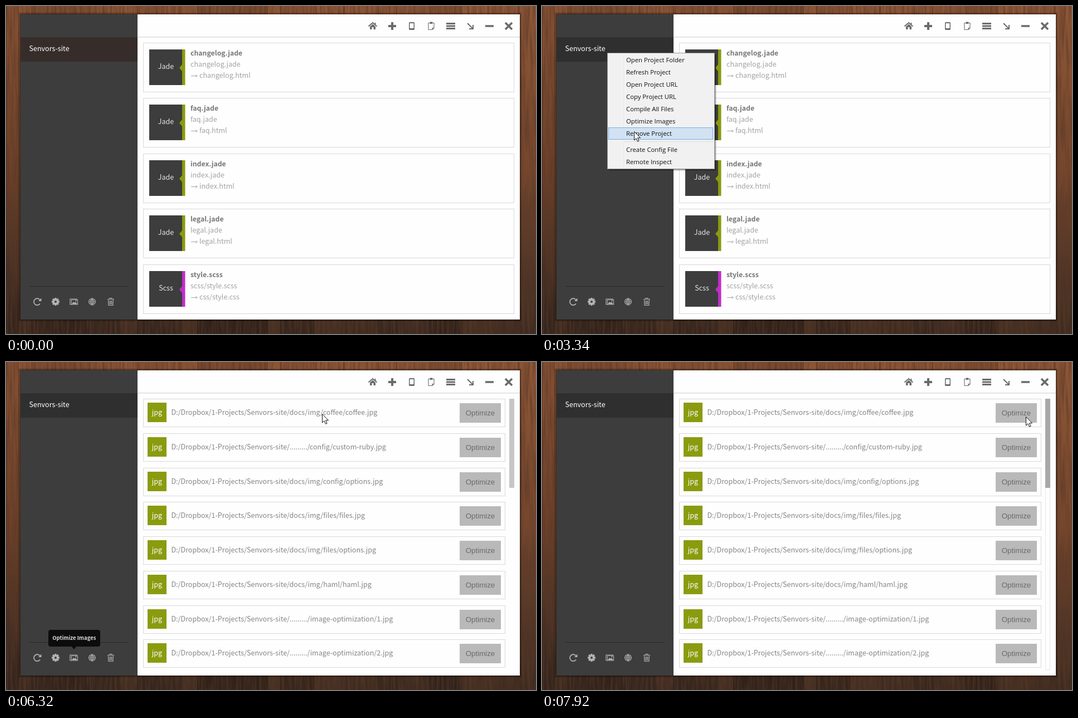
Recreate the animation shown at these times as an HTML page. Size 951 by 589 pixels, loop 8 s.

```html
<!DOCTYPE html>
<html lang="en">
<head>
<meta charset="utf-8">
<title>Project window</title>
<style>
html, body { margin: 0; width: 100%; height: 100%; overflow: hidden; background: #5a3725; }
svg { display: block; width: 951px; height: 589px; }
text { font: 12.54px 'Noto Sans CJK JP', 'Noto Sans CJK SC', 'Noto Sans CJK', 'Source Sans Pro', sans-serif; white-space: pre; }
.mid { text-anchor: middle; }
.title { font-weight: 700; font-size: 12.3px; }
.button { font: 13.33px 'Liberation Sans', Arial, sans-serif; }
.menu { font: 11.3px 'Open Sans', 'Noto Sans', sans-serif; }
.tip { font-weight: 700; font-size: 9.5px; }
</style>
</head>
<body>
<svg id="stage" viewBox="0 0 951 589" xmlns="http://www.w3.org/2000/svg">
  <defs>
    <linearGradient id="shade" x2="0" y2="1">
      <stop offset="0" stop-color="#8b5436"/>
      <stop offset=".5" stop-color="#70432b"/>
      <stop offset=".82" stop-color="#483024"/>
      <stop offset="1" stop-color="#34251d"/>
    </linearGradient>
    <filter id="grain" x="0" y="0" width="1" height="1">
      <feTurbulence type="fractalNoise" baseFrequency=".22 .012" numOctaves="3" seed="7"/>
      <feColorMatrix values="0 0 0 0 .1  0 0 0 0 .04  0 0 0 0 .02  1.6 0 0 0 -.6"/>
    </filter>
    <clipPath id="view"><rect x="240" y="66" width="680" height="487"/></clipPath>
  </defs>
</svg>
<script>
const stage = document.getElementById('stage');
const GREEN = '#8a9b0f', DARK = '#3d3d3d';

function add(parent, tag, attrs, content) {
  const node = document.createElementNS('http://www.w3.org/2000/svg', tag);
  for (const key in attrs) node.setAttribute(key, attrs[key]);
  if (content) node.textContent = content;
  return parent.appendChild(node);
}
const group = (parent, attrs) => add(parent, 'g', attrs);
const rect = (parent, x, y, width, height, fill, more) => add(parent, 'rect', { x, y, width, height, fill, ...more });
const frame = (parent, x, y, w, h, stroke, fill = 'none') => rect(parent, x + .5, y + .5, w - 1, h - 1, fill, { stroke });
const text = (parent, x, y, str, fill, cls = '') => add(parent, 'text', { x, y, fill, class: cls }, str);
const path = (parent, d, fill, more) => add(parent, 'path', { d, fill, ...more });
const line = (parent, d, stroke, width = 1) => path(parent, d, 'none', { stroke, 'stroke-width': width });
const show = (node, on) => node.setAttribute('display', on ? 'inline' : 'none');
const move = (node, x, y) => node.setAttribute('transform', `translate(${x} ${y})`);

function drawWood() {
  let seed = 11;
  const random = () => (seed = seed * 16807 % 2147483647) / 2147483647;
  rect(stage, 0, 0, 951, 589, 'url(#shade)');
  for (let x = 0; x < 951;) {
    const width = 22 + random() * 40;
    rect(stage, x, 0, width, 589, random() < .5 ? '#000' : '#c08050', { opacity: random() * .13 });
    rect(stage, x, 0, 1, 589, '#1c0f08', { opacity: .35 });
    x += width;
  }
  rect(stage, 0, 0, 951, 589, '#000', { filter: 'url(#grain)' });
}

function drawWindow() {
  for (const spread of [2, 4, 7])
    rect(stage, 26, 15, 896, 548, 'none', { stroke: '#000', 'stroke-width': spread, opacity: .16 });
  rect(stage, 26, 15, 896, 548, '#fefefe');
  rect(stage, 26, 15, 210, 548, DARK);
  rect(stage, 236, 55, 686, 1, '#dcdcdc');
  rect(stage, 236, 56, 686, 1, '#efefef');
  rect(stage, 42, 503, 178, 1, '#282828');
}

function drawToolbar() {
  const ink = '#6b6b6b';
  const icon = x => group(stage, { transform: `translate(${x} 36)` });
  const home = icon(658);
  line(home, 'M-7.5 .5L0-6L7.5 .5', ink, 2);
  path(home, 'M-5 1L0-3.5L5 1V6H1.5V2H-1.5V6H-5ZM3.5-6H5.5V-2L3.5-4Z', ink);
  line(icon(693), 'M-7 0H7M0-7V7', ink, 4);
  const tablet = icon(728);
  rect(tablet, -5, -7, 10, 14, ink, { rx: 1.5 });
  rect(tablet, -3.5, -5, 7, 9, '#fff');
  const clip = icon(763);
  line(clip, 'M-2.5-5.5H-5V6.5H2L5 3.5V-5.5H2.5M2 6.5V3.5H5', ink, 1.1);
  rect(clip, -2.5, -7.5, 5, 3.5, ink, { rx: 1 });
  line(icon(798), 'M-8-4.5H8M-8 0H8M-8 4.5H8', ink, 3);
  line(icon(833), 'M-5-5L4 4M5-2V5H-2', ink, 2);
  line(icon(867), 'M-7 0H8', ink, 3.5);
  line(icon(902), 'M-6-6L6 6M6-6L-6 6', ink, 3.6);
}

function drawSidebarIcons() {
  const ink = '#b4b4b4';
  const icon = x => group(stage, { transform: `translate(${x} 531)` });
  const refresh = icon(56);
  line(refresh, 'M4.5-3.8A6 6 0 1 0 5 3.5', ink, 1.7);
  path(refresh, 'M7.5-6.5V-1H2Z', ink);
  const gear = icon(89);
  for (let a = 0; a < 180; a += 45) rect(gear, -1.7, -7, 3.4, 14, ink, { transform: `rotate(${a})` });
  add(gear, 'circle', { r: 5.2, fill: ink });
  add(gear, 'circle', { r: 2, fill: DARK });
  const image = icon(122);
  line(image, 'M-4 5H-7V-5H5V-3.5', ink, 1.2);
  frame(image, -5, -4, 12, 9.5, ink);
  path(image, 'M-4 4.5L-1 0L1 2L3 .5L6 4.5Z', ink);
  add(image, 'circle', { cx: 3.5, cy: -1.3, r: 1.1, fill: ink });
  const globe = icon(154.5);
  line(globe, 'M-6 0A6 6 0 1 0 6 0A6 6 0 1 0-6 0ZM-6 0H6M0-6V6M-5-3H5M-5 3H5M0-6Q-6 0 0 6M0-6Q6 0 0 6', ink);
  const trash = icon(188);
  line(trash, 'M-6-4.5H6M-2-4.5V-6.5H2V-4.5M-4.5-3.5L-4 6.5H4L4.5-3.5M-2-2V5M0-2V5M2-2V5', ink, 1.1);
}

function drawCards() {
  const cards = group(stage);
  const files = [['changelog'], ['faq'], ['index'], ['legal'], ['style', 'Scss']];
  files.forEach(([name, kind = 'Jade'], i) => {
    const sass = kind === 'Scss', ext = kind.toLowerCase(), tint = sass ? '#c12dc8' : GREEN;
    const card = group(cards, { transform: `translate(0 ${Math.round(i * 99.5 - .1)})` });
    frame(card, 246, 66, 666, 89, '#d9d9d9', '#fefefe');
    rect(card, 257, 78, 60, 64, DARK);
    rect(card, 316, 78, 5.5, 64, tint);
    path(card, 'M316 105L311 111L316 117Z', tint);
    text(card, 287, 113, kind, '#e4e4e4', 'mid');
    text(card, 331, 89, `${name}.${ext}`, '#777', 'title');
    text(card, 331, 109, (sass ? 'scss/' : '') + `${name}.${ext}`, '#a3a3a3');
    line(card, 'M332 125.5H343M340.5 123L343 125.5L340.5 128', '#a3a3a3');
    text(card, 347, 129, sass ? 'css/style.css' : name + '.html', '#a3a3a3');
  });
  return cards;
}

function drawImages() {
  const images = group(stage);
  const rows = group(group(images, { 'clip-path': 'url(#view)' }));
  const long = '.........', short = 'docs/img';
  const files = [
    [short, 'coffee/coffee'], [long, 'config/custom-ruby'], [short, 'config/options'],
    [short, 'files/files'], [short, 'files/options'], [short, 'haml/haml'],
    [long, 'image-optimization/1'], [long, 'image-optimization/2'],
    [short, 'jade/jade'], [short, 'less/less'], [long, 'live-refresh/custom-server'],
    [long, 'live-refresh/open-live-url'], [long, 'livescript/livescript'], [long, 'markdown/markdown']
  ];
  files.forEach(([folder, name], i) => {
    const row = group(rows, { transform: `translate(0 ${Math.round(i * 61.75)})` });
    frame(row, 246, 66, 650, 51, '#d9d9d9', '#fefefe');
    rect(row, 254, 73, 34, 35, GREEN);
    text(row, 271, 95, 'jpg', '#fff', 'mid');
    text(row, 296.5, 95, `D:/Dropbox/1-Projects/Senvors-site/${folder}/${name}.jpg`, '#858585');
    rect(row, 814, 74, 74, 35, '#b9b9b9');
    text(row, 851, 96, 'Optimize', '#6a6a6a', 'mid button');
  });
  const track = frame(images, 903, 66, 9, 487, '#e6e6e6');
  const thumb = rect(images, 903, 66, 9, 160, '#c6c6c6');
  return { images, rows, track, thumb };
}

const menuItems = { 97: 'Open Project Folder', 119: 'Refresh Project', 141: 'Open Project URL', 163: 'Copy Project URL',
  185: 'Compile All Files', 207: 'Optimize Images', 229: 'Remove Project', 258: 'Create Config File', 280: 'Remote Inspect' };

function drawMenu() {
  const menu = group(stage);
  for (const spread of [1, 2, 3]) rect(menu, 118 + spread, 85 + spread, 192, 208, '#000', { opacity: .15 });
  frame(menu, 117, 84, 193, 209, '#979797', '#f1f1f1');
  rect(menu, 147, 86, 1, 205, '#e0e0e0');
  rect(menu, 148, 86, 1, 205, '#fff');
  rect(menu, 148, 243, 159, 1, '#dcdcdc');
  const highlight = frame(menu, 119, 86, 188, 22, '#78aee5', '#d1e2f2');
  for (const y in menuItems) text(menu, 151, +y + 4, menuItems[y], '#111', 'menu');
  return { menu, highlight };
}

function drawTooltip() {
  const tip = group(stage);
  rect(tip, 76, 481, 93, 30, '#0c0c0c', { rx: 4 });
  path(tip, 'M117 510H127L122 516Z', '#0c0c0c');
  text(tip, 122.3, 498.5, 'Optimize Images', '#dcdcdc', 'mid tip');
  return tip;
}

drawWood();
drawWindow();
const itemTop = rect(stage, 26, 56, 210, 10, '#362d2a');
const itemBody = rect(stage, 26, 66, 210, 34, '#362d2a');
text(stage, 41.5, 81, 'Senvors-site', '#fff');
drawToolbar();
drawSidebarIcons();
const cards = drawCards();
const { images, rows, track, thumb } = drawImages();
const { menu, highlight } = drawMenu();
const tooltip = drawTooltip();
const outline = { stroke: '#111', 'stroke-linejoin': 'round' };
const arrow = path(stage, 'M.5 .5V16L4 12.7L6.5 18.3L9 17.2L6.5 11.8H11.5Z', '#fff', outline);
const hand = path(stage, 'M-2 1Q0-1 2 1V7.5Q4 7 5 9Q7 8 8 10Q10 10 10 12V16Q10 20 8 22H-1Q-4 17-6 14Q-7 10.5-4 12L-2 14Z', '#fff', outline);

const times = [[0, 0, 1], [870, 138.5, 8], [1990, 137, 8], [3090, 125, 3], [3480, 135, 5], [4170, 130, 9],
  [5330, 0, 1], [5630, 0, 1], [5760, 140, 5], [6440, 120, 2], [6680, 142, 6], [7530, 130, 2], [7800, 120, 2]]
  .flatMap(([start, gap, count]) => Array.from({ length: count }, (_, i) => start + i * gap));

// Pointer route: [time, x, y].
const route = [[870, 560, 310], [1290, 400, 190], [1560, 250, 120], [1839, 24, 93], [1990, 24, 93], [2400, 117, 84],
  [2540, 117, 84], [2949, 156, 203], [3340, 165, 225], [3615, 170, 262], [3885, 168, 278], [4020, 166, 272],
  [4300, 100, 300], [4430, 84, 330], [4950, 95, 480], [5210, 116, 537], [5330, 119, 538], [5630, 120, 529],
  [6040, 120, 529], [6320, 567, 93], [6560, 650, 110], [6680, 760, 140], [6822, 895, 168], [6964, 908, 170.5],
  [7390, 908, 266], [7530, 908, 285], [7660, 908, 250], [7800, 908, 196], [7920, 868, 98]];

function pointerAt(t) {
  const next = route.findIndex(key => key[0] > t);
  if (next < 0) return route[route.length - 1].slice(1);
  if (next === 0) return route[0].slice(1);
  const [t0, x0, y0] = route[next - 1], [t1, x1, y1] = route[next];
  const k = (t - t0) / (t1 - t0);
  return [Math.round(x0 + (x1 - x0) * k), Math.round(y0 + (y1 - y0) * k)];
}

function render(clock) {
  const t = times.filter(time => time <= clock).pop();
  const [x, y] = pointerAt(t);

  itemTop.setAttribute('fill', t < 1990 ? '#362d2a' : '#2f2f2f');
  itemBody.setAttribute('fill', t < 870 ? '#362d2a' : '#2f2f2f');

  const listing = t >= 5900;
  show(cards, !listing);
  show(images, listing);
  const dragging = t >= 6960 && t < 7900;
  const offset = dragging ? Math.max(0, y - 170.5) : 0;
  show(track, t >= 6820);
  thumb.setAttribute('fill', t >= 6960 ? '#a8a8a8' : '#c6c6c6');
  move(thumb, 0, Math.round(offset));
  move(rows, 0, -Math.round(offset * 3.06));

  show(menu, t >= 2530 && t < 4300);
  const hovered = Object.keys(menuItems).find(center => Math.abs(y - center) <= 11);
  show(highlight, hovered && x >= 119);
  if (hovered) move(highlight, 0, hovered - 97);

  show(tooltip, t >= 5760 && t < 6440);
  const pointing = t >= 5200 && y > 520;
  show(arrow, t >= 870 && !pointing);
  show(hand, pointing);
  move(pointing ? hand : arrow, x, y);
}

function tick(now) {
  render(now % 8000);
  requestAnimationFrame(tick);
}
render(0);
requestAnimationFrame(tick);
</script>
</body>
</html>
```
